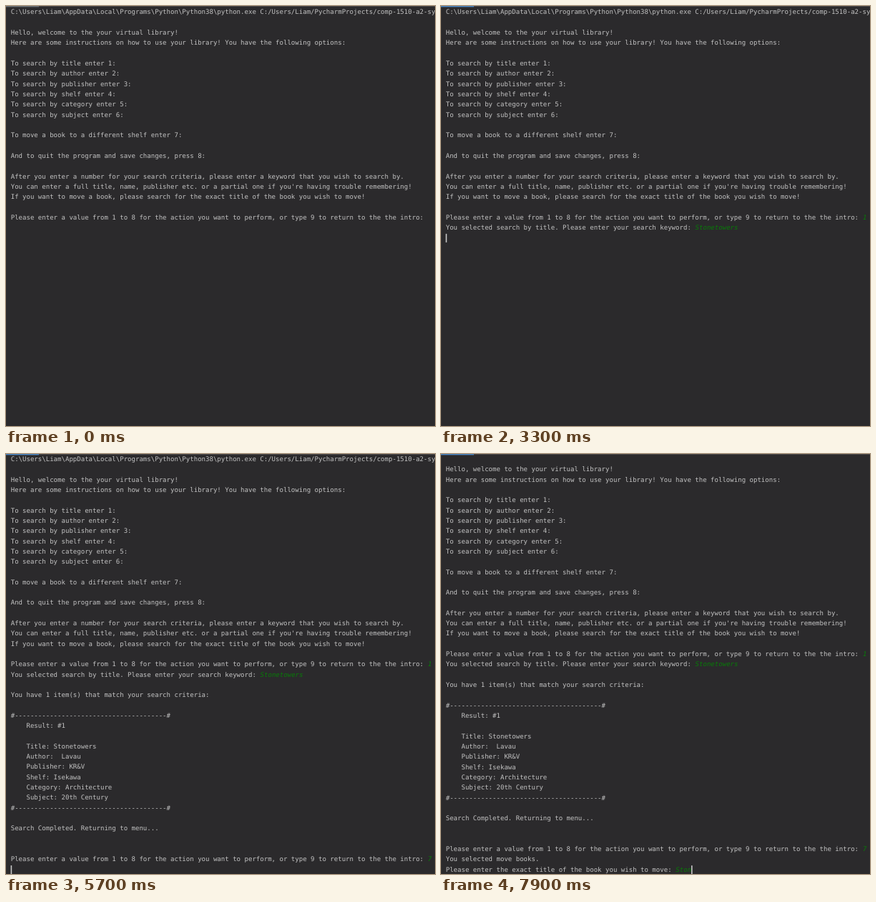
Write an HTML page that moves like this. It is 600 px wide and 586 px high and loops after 8000 ms.

```html
<!DOCTYPE html>
<html lang="en">
<head>
<meta charset="utf-8">
<title>Virtual library console</title>
<style>
html, body { margin: 0; width: 100%; height: 100%; overflow: hidden; background: #2b2a2c; }
svg { display: block; }
text {
  font-family: "DejaVu Sans Mono", "Noto Sans Mono", monospace;
  font-size: 9.055px;
  fill: #c2c2c2;
  white-space: pre;
  text-rendering: geometricPrecision;
}
.input { fill: #087c08; font-style: italic; }
</style>
</head>
<body>
<svg id="stage" width="600" height="586" viewBox="0 0 600 586">
  <rect width="600" height="586" fill="#2b2a2c"/>
  <g id="console"></g>
  <rect width="600" height="1" fill="#4c4848"/>
  <rect id="tab" width="46" height="1.4"/>
</svg>
<script>
const LOOP = 8000;
const LEFT = 6.7, COL = 5.451, ROW = 14.316, BASE = 11.48;
const WORD = "Stonetowers";
const PROMPT = "Please enter a value from 1 to 8 for the action you want to perform, or type 9 to return to the the intro: ";
const KEYWORD = "You selected search by title. Please enter your search keyword: ";
const MOVE = "Please enter the exact title of the book you wish to move: ";
const RULE = "#" + "-".repeat(39) + "#";

const LINES = [
  "C:\\Users\\Liam\\AppData\\Local\\Programs\\Python\\Python38\\python.exe C:/Users/Liam/PycharmProjects/comp-1510-a2-sy",
  "",
  "Hello, welcome to the your virtual library!",
  "Here are some instructions on how to use your library! You have the following options:",
  "",
  "To search by title enter 1:",
  "To search by author enter 2:",
  "To search by publisher enter 3:",
  "To search by shelf enter 4:",
  "To search by category enter 5:",
  "To search by subject enter 6:",
  "",
  "To move a book to a different shelf enter 7:",
  "",
  "And to quit the program and save changes, press 8:",
  "",
  "After you enter a number for your search criteria, please enter a keyword that you wish to search by.",
  "You can enter a full title, name, publisher etc. or a partial one if you're having trouble remembering!",
  "If you want to move a book, please search for the exact title of the book you wish to move!",
  "",
  PROMPT,
  KEYWORD,
  "",
  "You have 1 item(s) that match your search criteria:",
  "",
  RULE,
  "    Result: #1",
  "",
  "    Title: " + WORD,
  "    Author:  Lavau",
  "    Publisher: KR&V",
  "    Shelf: Isekawa",
  "    Category: Architecture",
  "    Subject: 20th Century",
  RULE,
  "",
  "Search Completed. Returning to menu...",
  "",
  "",
  PROMPT,
  "You selected move books.",
  MOVE
];

const panel = document.getElementById("console");
const tab = document.getElementById("tab");

function add(tag, attrs) {
  const el = document.createElementNS("http://www.w3.org/2000/svg", tag);
  for (const key in attrs) el.setAttribute(key, attrs[key]);
  return panel.appendChild(el);
}

function addText(row, col, str, cls) {
  const el = add("text", { x: LEFT + col * COL, y: BASE + row * ROW, class: cls });
  el.textContent = str;
  return el;
}

const rows = LINES.map((str, i) => addText(i, 0, str, "output"));

// Typed answers: row, text, and the time at which each character count is reached
const inputs = [
  { row: 20, str: "1", keys: [[1400, 1]] },
  { row: 21, str: WORD, keys: [[2100, 1], [2300, 3], [2500, 4], [2600, 5], [2700, 6],
                               [2800, 8], [2900, 9], [3000, 10], [3100, 11]] },
  { row: 39, str: "7", keys: [[5400, 1]] },
  { row: 41, str: WORD, keys: [[7200, 1], [7500, 2], [7600, 3], [7900, 4]] }
];
for (const it of inputs) it.el = addText(it.row, LINES[it.row].length, "", "input");

const caret = add("rect", { width: 1.6, height: 12, fill: "#c6c6c6" });

const rowCount = [[0, 21], [1900, 22], [3500, 40], [5800, 42]];
const caretRow = [[0, 20], [1700, 21], [3300, 22], [3500, 39], [5600, 40], [5800, 41]];
const caretOn = [[0, 0], [1000, 1], [4400, 0], [4900, 1], [6400, 0], [6900, 1]];
const scroll = [[0, 0], [5700, 1.5], [5800, 15.7]];

function at(track, t) {
  let value = 0;
  for (const [time, v] of track) if (t >= time) value = v;
  return value;
}

function draw(t) {
  const shown = at(rowCount, t);
  rows.forEach((el, i) => el.setAttribute("visibility", i < shown ? "visible" : "hidden"));

  const row = at(caretRow, t);
  let col = row < shown ? LINES[row].length : 0;
  for (const it of inputs) {
    const n = at(it.keys, t);
    it.el.textContent = it.str.slice(0, n);
    if (it.row === row) col += n;
  }
  caret.setAttribute("x", LEFT + col * COL - 0.1);
  caret.setAttribute("y", BASE + row * ROW - 8.6);
  caret.setAttribute("visibility", at(caretOn, t) ? "visible" : "hidden");

  panel.setAttribute("transform", `translate(0 ${-at(scroll, t)})`);
  tab.setAttribute("fill", t < 1000 ? "#6e7478" : "#4a88c7");
}

const start = performance.now();
function tick(now) {
  draw(Math.max(0, now - start) % LOOP);
  requestAnimationFrame(tick);
}
draw(0);
requestAnimationFrame(tick);
</script>
</body>
</html>
```
